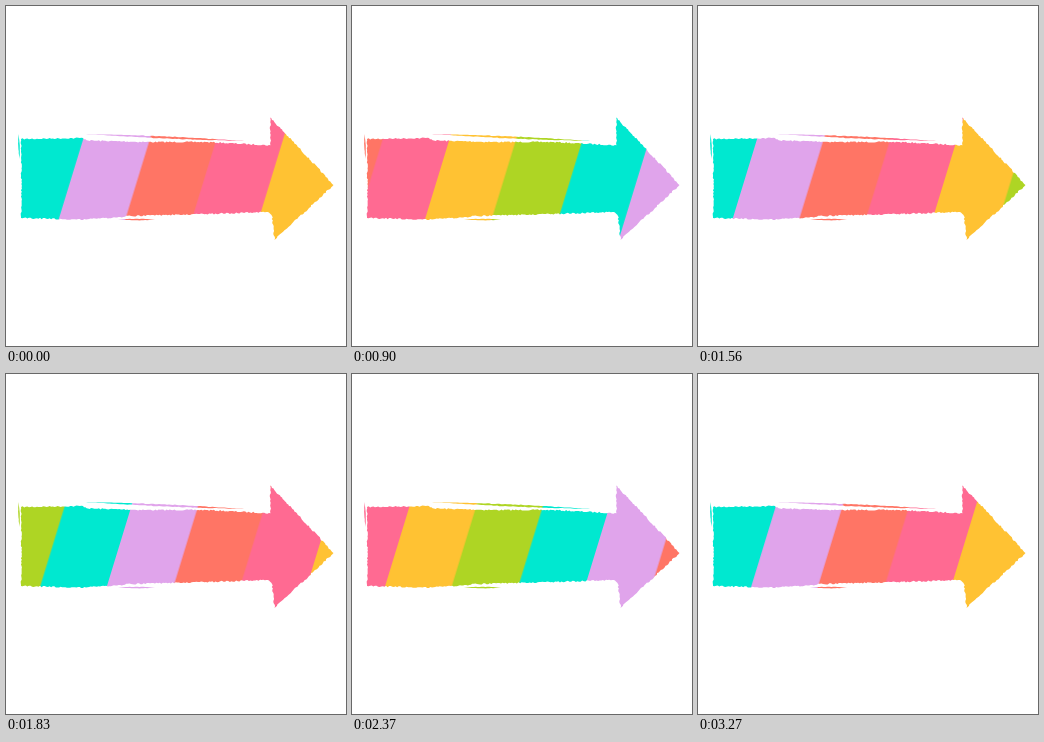
These frames come from a looping animation (340x340 px, 3300 ms). An HTML page:

```html
<!DOCTYPE html>
<html lang="en">
<head>
<meta charset="utf-8">
<title>Striped arrow</title>
<style>
html, body { margin: 0; width: 100%; height: 100%; overflow: hidden; background: #fff; }
svg { display: block; width: 100vw; height: 100vh; }
#stripes { animation: slide 3300ms steps(110, end) infinite; }
@keyframes slide {
  from { transform: translateX(0); }
  to { transform: translateX(807.5px); }
}
</style>
</head>
<body>
<svg viewBox="0 0 340 340" xmlns="http://www.w3.org/2000/svg">
  <defs><clipPath id="arrow"><path id="outline"/></clipPath></defs>
  <g clip-path="url(#arrow)">
    <g id="stripes"><g id="bands" transform="skewX(-17)"></g></g>
  </g>
</svg>
<script>
const COLORS = ['#e0a4eb', '#ff7565', '#ff6a92', '#ffc233', '#aed524', '#00e8d0'];
const WIDTH = 66.65, START = 117.9;

let seed = 7;
function random() {
  seed = (seed * 16807) % 2147483647;
  return seed / 2147483647;
}

const toPath = pts => 'M' + pts.map(p => p.map(v => v.toFixed(2)).join(' ')).join('L') + 'Z';

// Closed shape whose sides are broken into short, chalky steps.
function rough(corners, amount) {
  return toPath(corners.flatMap(([x, y], i) => {
    const [nx, ny] = corners[(i + 1) % corners.length];
    const dx = nx - x, dy = ny - y, len = Math.hypot(dx, dy);
    const n = Math.ceil(len / 1.6);
    return Array.from({ length: n }, (_, k) => {
      const off = k ? (random() - 0.5) * amount / len : 0;
      return [x + dx * k / n - dy * off, y + dy * k / n + dx * off];
    });
  }));
}

// Thin dry-brush mark that tapers at both ends.
function sliver(x1, y1, x2, y2, thick) {
  const n = Math.ceil(Math.hypot(x2 - x1, y2 - y1) / 2);
  const upper = [], lower = [];
  for (let k = 0; k <= n; k++) {
    const u = k / n, half = thick / 2 * Math.sin(Math.PI * u);
    const x = x1 + (x2 - x1) * u, y = y1 + (y2 - y1) * u;
    const side = Math.abs(x2 - x1) > Math.abs(y2 - y1) ? [0, 1] : [-1, 0];
    const edge = s => [0, 1].map(a => [x, y][a] + s * side[a] * half * (0.7 + 0.6 * random()));
    upper.push(edge(-1));
    lower.unshift(edge(1));
  }
  return toPath([...upper, ...lower]);
}

const corners = [
  [15, 133], [77, 132], [82, 134.5], [140, 136], [200, 136], [264.5, 139.3],
  [264, 111.5], [295, 144], [327.5, 179], [268.5, 234], [266, 210], [262, 206],
  [200, 208], [125, 210], [80, 213.5], [15, 212], [15.5, 175]
];

document.getElementById('outline').setAttribute('d',
  rough(corners, 1.4) +
  sliver(80, 128, 240, 135, 2) +
  sliver(12.5, 128, 13.5, 153, 1.4) +
  sliver(112, 213.6, 149, 213.6, 1.5));

const bands = document.getElementById('bands');
for (let i = -14; i < 5; i++) {
  const band = document.createElementNS('http://www.w3.org/2000/svg', 'rect');
  const attrs = { x: START + i * WIDTH, width: WIDTH + 1, height: 340, fill: COLORS[(i + 18) % 6] };
  for (const name in attrs) band.setAttribute(name, attrs[name]);
  bands.append(band);
}
</script>
</body>
</html>
```
